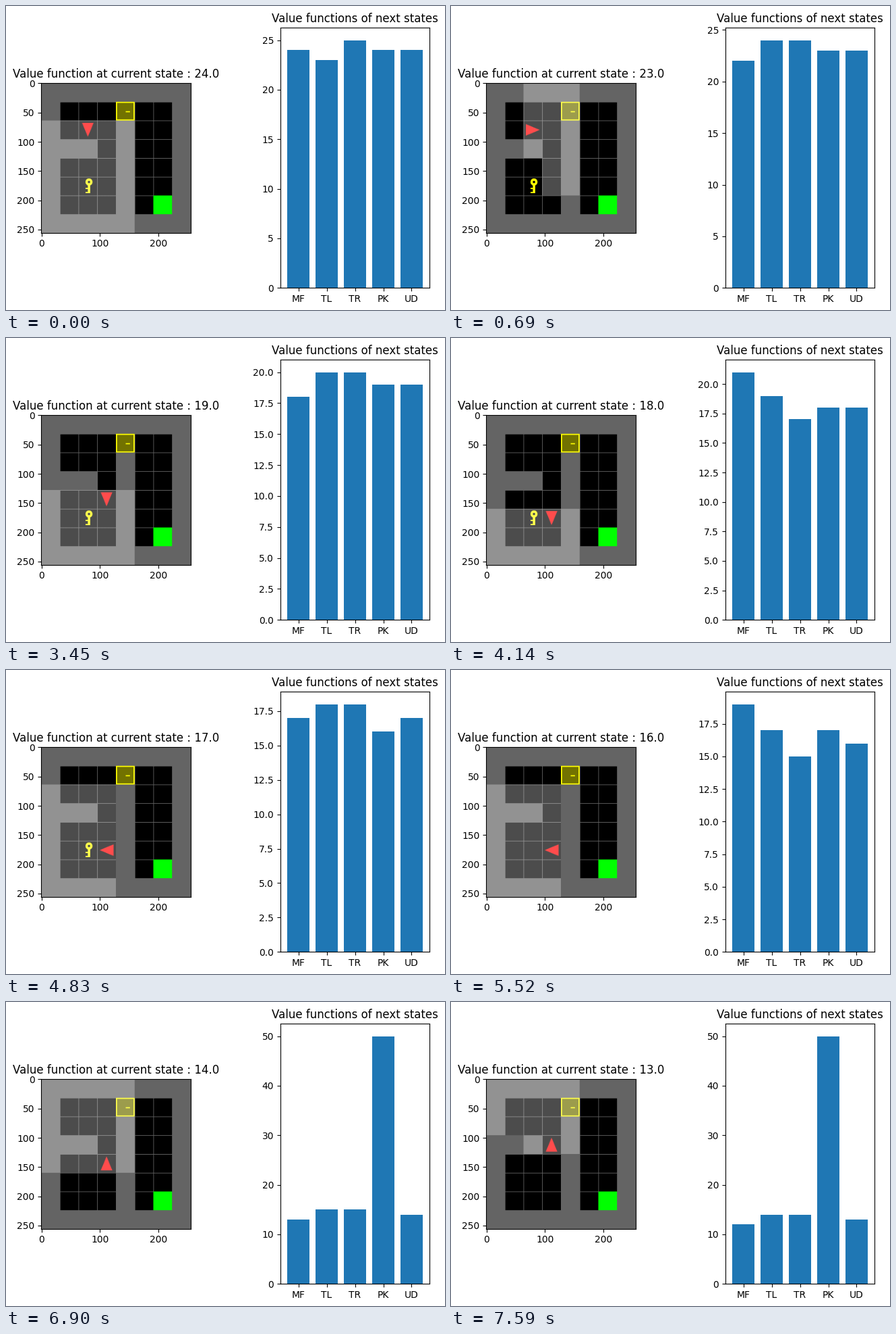
A matplotlib script for the animation above (8 s loop, 651 px wide and 450 px high).

```python
import numpy as np
import matplotlib.pyplot as plt
from matplotlib.animation import FuncAnimation

W, H, DPI = 651, 450, 100
LOOP, TICK, STEP = 8000, 40, 690  # ms
SIZE, TILE, SUB = 8, 32, 3
VIEW = 7

GREY, YELLOW = (100, 100, 100), (255, 255, 0)
RED, GREEN = (255, 0, 0), (0, 255, 0)
HEADINGS = [(1, 0), (0, 1), (-1, 0), (0, -1)]  # right, down, left, up

DOOR, KEY, GOAL = (4, 1), (2, 5), (6, 6)
WALLS = {(x, y) for x in range(SIZE) for y in range(SIZE)
         if x in (0, 4, 7) or y in (0, 7) or (y == 3 and x < 3)} - {DOOR}

START, ACTIONS = (2, 2, 1), "LFRFFFRPRFF"
LABELS = ["MF", "TL", "TR", "PK", "UD"]
NEXT_VALUES = [
    (24, 23, 25, 24, 24), (22, 24, 24, 23, 23), (22, 23, 21, 22, 22),
    (20, 22, 22, 21, 21), (19, 21, 21, 20, 20), (18, 20, 20, 19, 19),
    (21, 19, 17, 18, 18), (17, 18, 18, 16, 17), (19, 17, 15, 17, 16),
    (14, 16, 16, 18, 15), (13, 15, 15, 50, 14), (12, 14, 14, 50, 13),
]

# Sample points of one supersampled tile, in 0..1
u = (np.arange(TILE * SUB) + 0.5) / (TILE * SUB)
X, Y = np.meshgrid(u, u)


def rect(x0, x1, y0, y1):
    return (X >= x0) & (X <= x1) & (Y >= y0) & (Y <= y1)


def disc(cx, cy, r):
    return (X - cx) ** 2 + (Y - cy) ** 2 <= r * r


def arrow(heading):
    right = (X >= 0.12) & (np.abs(Y - 0.5) <= 0.31 * (0.87 - X) / 0.75)
    return np.rot90(right, -heading)


def draw_tile(cell, agent, has_key, lit):
    img = np.zeros((TILE * SUB, TILE * SUB, 3))
    img[rect(0, 0.031, 0, 1) | rect(0, 1, 0, 0.031)] = GREY
    if cell in WALLS:
        img[:] = GREY
    elif cell == GOAL:
        img[:] = GREEN
    elif cell == DOOR:
        img[:] = YELLOW
        img[rect(0.06, 0.94, 0.06, 0.94)] = 0.45 * np.array(YELLOW)
        img[rect(0.52, 0.75, 0.50, 0.56)] = YELLOW
    elif cell == KEY and has_key:
        shaft = rect(0.50, 0.63, 0.31, 0.88)
        teeth = rect(0.38, 0.50, 0.59, 0.66) | rect(0.38, 0.50, 0.81, 0.88)
        img[shaft | teeth | disc(0.56, 0.28, 0.19)] = YELLOW
        img[disc(0.56, 0.28, 0.064)] = 0
    if cell == agent[:2]:
        img[arrow(agent[2])] = RED
    if lit:
        img += 0.3 * (255 - img)
    img = np.floor(img)
    return img.reshape(TILE, SUB, TILE, SUB, 3).mean(axis=(1, 3))


def visible_cells(agent):
    """Cells seen in the square ahead of the agent, walls blocking sight."""
    ax, ay, heading = agent
    fx, fy = HEADINGS[heading]
    rx, ry = -fy, fx
    mid = VIEW // 2

    def world(i, j):
        side, ahead = i - mid, VIEW - 1 - j
        return ax + fx * ahead + rx * side, ay + fy * ahead + ry * side

    def opaque(cell):
        inside = 0 <= cell[0] < SIZE and 0 <= cell[1] < SIZE
        return not inside or cell in WALLS or cell == DOOR

    seen = {(mid, VIEW - 1)}
    for j in reversed(range(VIEW)):
        sweeps = [(range(VIEW - 1), 1), (range(VIEW - 1, 0, -1), -1)]
        for columns, d in sweeps:
            for i in columns:
                if (i, j) not in seen or opaque(world(i, j)):
                    continue
                seen.add((i + d, j))
                if j > 0:
                    seen |= {(i + d, j - 1), (i, j - 1)}
    return {world(i, j) for i, j in seen}


def draw_grid(agent, has_key):
    lit = visible_cells(agent)
    rows = [np.hstack([draw_tile((x, y), agent, has_key, (x, y) in lit)
                       for x in range(SIZE)]) for y in range(SIZE)]
    return np.vstack(rows).astype(np.uint8)


def play():
    agent, has_key = START, True
    yield draw_grid(agent, has_key)
    for action in ACTIONS:
        x, y, heading = agent
        if action == "F":
            dx, dy = HEADINGS[heading]
            agent = (x + dx, y + dy, heading)
        elif action == "P":
            has_key = False
        else:
            turn = 1 if action == "R" else -1
            agent = (x, y, (heading + turn) % 4)
        yield draw_grid(agent, has_key)


def add_axes(left, bottom, width, height):
    return fig.add_axes([left / W, bottom / H, width / W, height / H])


grids = list(play())

fig = plt.figure(figsize=(W / DPI, H / DPI), dpi=DPI)
ax_grid = add_axes(52.4, 114.45, 221.5, 221.5)
ax_bars = add_axes(406.8, 32.7, 221.5, 385)

picture = ax_grid.imshow(grids[0])
grid_title = ax_grid.set_title("")
bars = ax_bars.bar(LABELS, NEXT_VALUES[0])
ax_bars.set_title("Value functions of next states")


def update(i):
    # The state reached by the end of this tick
    k = min((i * TICK + TICK - 1) // STEP, len(grids) - 1)
    picture.set_data(grids[k])
    grid_title.set_text(f"Value function at current state : {24 - k:.1f}")
    for bar, value in zip(bars, NEXT_VALUES[k]):
        bar.set_height(value)
    ax_bars.set_ylim(0, 1.05 * max(NEXT_VALUES[k]))
    return [picture, grid_title, *bars]


anim = FuncAnimation(fig, update, frames=LOOP // TICK, interval=TICK,
                     repeat=True, repeat_delay=0)
plt.show()
```
